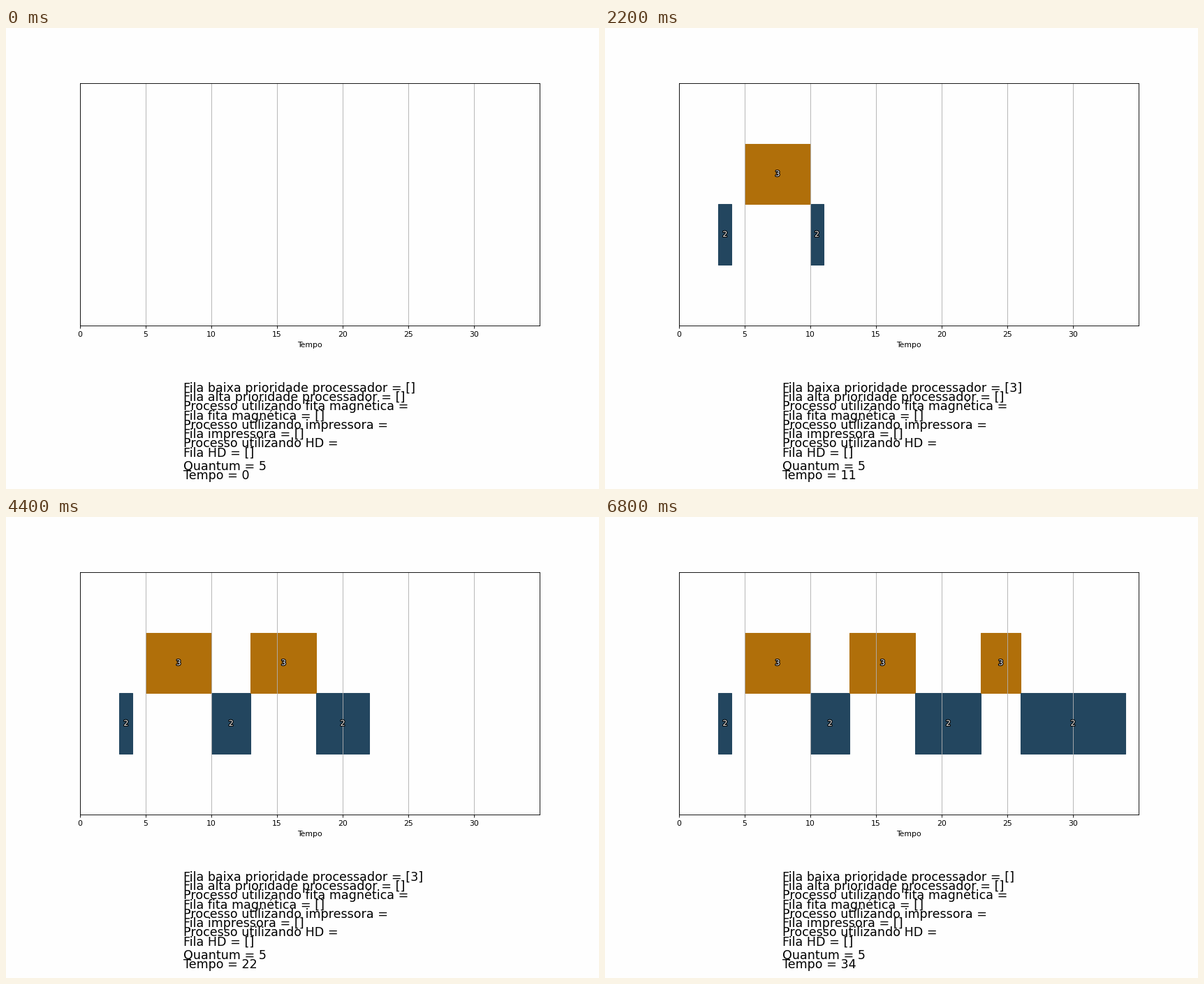
These frames come from a looping animation (849 by 660 pixels, 7000 ms). A matplotlib script:

```python
import matplotlib.pyplot as plt
from matplotlib.animation import FuncAnimation
from matplotlib.patches import Rectangle
from matplotlib.patheffects import withStroke

WIDTH, HEIGHT, DPI = 849, 660, 80
FRAMES, STEP_MS = 35, 200
QUANTUM = 5
SMALL, LARGE = 9.84, 15.75
PAPER = "#fefefe"

# process -> (row, colour)
PROCESSES = {2: (1, "#23465f"), 3: (2, "#b06f0a")}

# (process, start, end) for each turn on the processor
RUNS = [(2, 3, 4), (3, 5, 10), (2, 10, 13), (3, 13, 18),
        (2, 18, 23), (3, 23, 26), (2, 26, 34)]

# (process, start, end) spent in each queue or device
LOW = [(3, 10, 13), (3, 18, 23), (2, 23, 26)]
HIGH = [(2, 9, 10)]
TAPE = [(2, 4, 9)]
PRINTER = [(2, 13, 18)]

plt.rcParams["font.family"] = "DejaVu Sans"
plt.rcParams["font.size"] = SMALL

fig = plt.figure(figsize=(WIDTH / DPI, HEIGHT / DPI), dpi=DPI, facecolor=PAPER)
ax = fig.add_axes([0.1249, 0.355, 0.775, 0.525], facecolor=PAPER)
ax.set_xlim(0, 35)
ax.set_ylim(0, 4)
ax.set_xticks(range(0, 35, 5))
ax.set_yticks([])
ax.tick_params(axis="x", pad=4.4)
ax.set_xlabel("Tempo")
ax.grid(True, axis="x")


def make_bar(pid, start):
    row, color = PROCESSES[pid]
    bar = ax.add_patch(Rectangle((start, row), 0, 1, facecolor=color,
                                 edgecolor=color, linewidth=0.95, zorder=1))
    label = ax.text(start, row + 0.5, str(pid), color="white",
                    ha="center", va="center",
                    path_effects=[withStroke(linewidth=2, foreground="black")])
    return bar, label


bars = [make_bar(pid, start) for pid, start, _ in RUNS]
LINE_Y = [0.2107 - 0.02 * i for i in range(8)] + [0.0407, 0.0207]
lines = [fig.text(0.2994, y, "", fontsize=LARGE) for y in LINE_Y]


def active(spans, t):
    return [pid for pid, start, end in spans if start < t <= end]


def user(spans, t):
    return "".join(str(pid) for pid in active(spans, t))


def status(t):
    return [
        f"Fila baixa prioridade processador = {active(LOW, t)}",
        f"Fila alta prioridade processador = {active(HIGH, t)}",
        f"Processo utilizando fita magnética = {user(TAPE, t)}",
        "Fila fita magnética = []",
        f"Processo utilizando impressora = {user(PRINTER, t)}",
        "Fila impressora = []",
        "Processo utilizando HD = ",
        "Fila HD = []",
        f"Quantum = {QUANTUM}",
        f"Tempo = {t}",
    ]


def update(t):
    for (bar, label), (_, start, end) in zip(bars, RUNS):
        length = min(t, end) - start
        bar.set_visible(length > 0)
        label.set_visible(length > 0)
        bar.set_width(max(length, 0))
        label.set_x(start + length / 2)
    for line, text in zip(lines, status(t)):
        line.set_text(text)
    return []


anim = FuncAnimation(fig, update, frames=FRAMES, init_func=lambda: update(0),
                     interval=STEP_MS, repeat=True, repeat_delay=0, blit=False)
plt.show()
```
